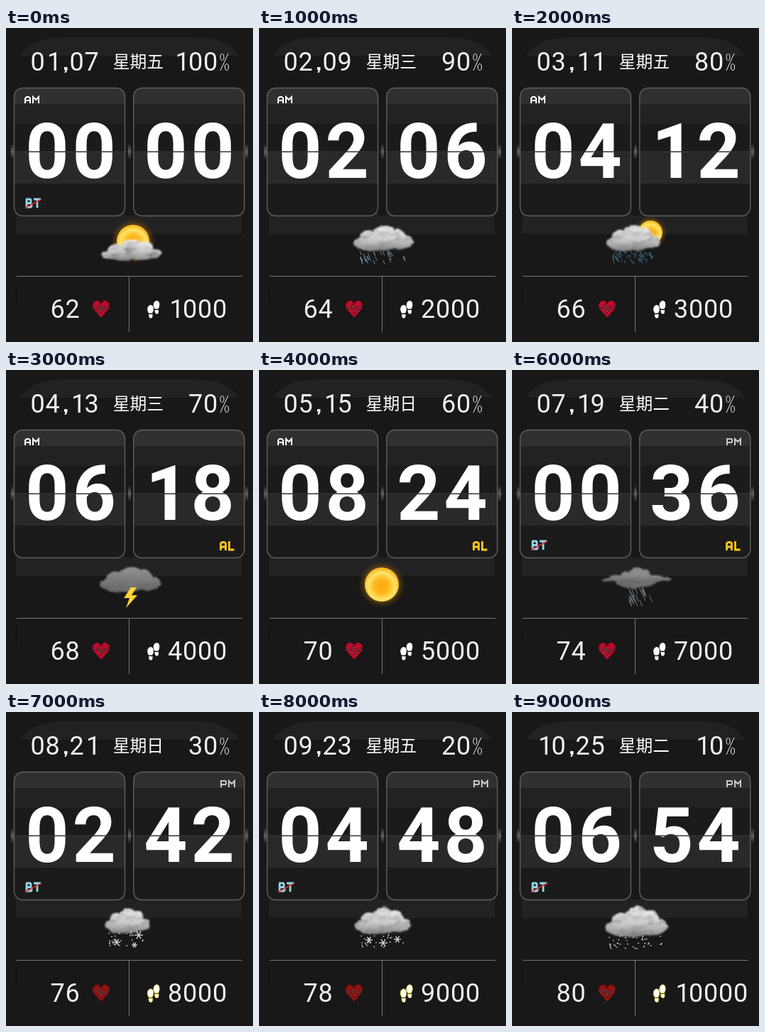
Animation, 348 px wide and 442 px high, one loop 10000 ms. Source, as an HTML page:

```html
<!DOCTYPE html>
<html lang="zh">
<head>
<meta charset="utf-8">
<title>Flip clock watch face</title>
<style>
  html, body { margin: 0; width: 100%; height: 100%; overflow: hidden; background: #181818; }
  svg { display: block; width: 100%; height: 100%; }
  .small { font: 400 36px Roboto, sans-serif; fill: #f0f0f0; }
  .big { font: 700 107px Roboto, sans-serif; text-anchor: middle; fill: #fff; }
  .day { font: 500 23.8px "Noto Sans CJK SC", "Noto Sans CJK", sans-serif; fill: #fff; }
  .tag { fill: none; stroke-width: 2; }
  .bold { stroke-width: 2.8; }
</style>
</head>
<body>
<svg viewBox="0 0 348 442" preserveAspectRatio="none">
  <defs>
    <radialGradient id="sunFill" cx=".5" cy=".55" r=".5">
      <stop offset="0" stop-color="#ffa30c"/><stop offset=".45" stop-color="#ffb91f"/>
      <stop offset=".8" stop-color="#ffe56a"/><stop offset="1" stop-color="#f6bd2c"/>
    </radialGradient>
    <radialGradient id="glow">
      <stop offset=".6" stop-color="#c98108" stop-opacity=".6"/>
      <stop offset="1" stop-color="#6b4200" stop-opacity="0"/>
    </radialGradient>
    <linearGradient id="light" x2="0" y2="1">
      <stop offset="0" stop-color="#f2f2f2"/><stop offset=".6" stop-color="#c8c8c8"/><stop offset="1" stop-color="#858585"/>
    </linearGradient>
    <linearGradient id="dark" x2="0" y2="1">
      <stop offset="0" stop-color="#999"/><stop offset="1" stop-color="#606060"/>
    </linearGradient>
    <linearGradient id="hinge" x2="0" y2="1">
      <stop offset="0" stop-color="#222"/><stop offset=".5" stop-color="#606060"/><stop offset="1" stop-color="#222"/>
    </linearGradient>
    <filter id="fluff" x="-10%" y="-15%" width="120%" height="130%">
      <feTurbulence type="fractalNoise" baseFrequency=".06 .12" numOctaves="3" seed="4" result="noise"/>
      <feColorMatrix in="noise" values="0 0 0 0 .2  0 0 0 0 .2  0 0 0 0 .2  2.2 0 0 0 -.95" result="shade"/>
      <feComposite in="shade" in2="SourceGraphic" operator="atop" result="mottled"/>
      <feDisplacementMap in="mottled" in2="noise" scale="6" xChannelSelector="R" yChannelSelector="G"/>
      <feGaussianBlur stdDeviation=".8"/>
    </filter>
    <clipPath id="cardClip"><rect width="156" height="180" rx="12"/></clipPath>
    <g id="card">
      <g clip-path="url(#cardClip)">
        <path fill="#1b1b1b" d="M0 0H156V180H0z"/>
        <path fill="#303030" d="M0 0H156V22.500H0z"/>
        <path fill="#222" d="M0 22.500H156V50.500H0z"/>
        <path fill="#292929" d="M0 89.500H156V134.500H0z"/>
      </g>
      <rect width="156" height="180" rx="12" fill="none" stroke="#606060" stroke-width="1.4"/>
    </g>
    <path id="pin" fill="url(#hinge)" d="M-2 -10H2V10H-2z"/>
  </defs>

  <path fill="#181818" d="M0 0H348V442H0z"/>
  <path fill="#222" d="M20 39Q36 13 82 13H266Q312 13 328 39z"/>
  <path fill="#222" d="M14 258H332V290H14z"/>
  <path fill="#181818" d="M168 84H180V264H168z"/>
  <path stroke="#0c0c0c" d="M14.500 360V388"/>
  <use href="#card" x="11.5" y="84.5"/>
  <use href="#card" x="179.8" y="84.5"/>
  <path stroke="#444" d="M5 174.5H343"/>
  <use href="#pin" x="9" y="174"/>
  <use href="#pin" x="174" y="174"/>
  <use href="#pin" x="339" y="174"/>
  <path stroke="#777" d="M15 349.5H333M173.5 350V428"/>

  <g id="face"></g>

  <g fill="none" stroke="#f0f0f0">
    <path d="M313 36L302 60"/>
    <ellipse cx="304.5" cy="41" rx="2.5" ry="4.5"/>
    <ellipse cx="311" cy="55" rx="2.5" ry="4.5"/>
  </g>
  <path fill="#f0f0f0" d="M82 55H86.500V59L84.500 63H82.500L83.500 59H82z"/>
  <path stroke="#343434" stroke-width="1.6" d="M12 174.300H167M181 174.300H335"/>
</svg>
<script>
const face = document.getElementById('face');
const STEP = 1000, COUNT = 10;
const weekdays = '五三五三五日五二日五二';
const weekday = i => '五三五三日五二日五二'[i];

const pad = n => String(n).padStart(2, '0');
const text = (x, y, value, cls) => `<text x="${x}" y="${y}" class="${cls}">${value}</text>`;

// Fixed pitch digits; the narrow 1 sits a little to the right in its cell.
const digits = (value, x, y, pitch, cls) => [...String(value)].map((c, i) =>
  text(x + i * pitch + (c === '1' ? 2.5 : 0), y, c, cls)).join('');
const small = (x, y, value) => digits(value, x, y, 21, 'small');
const pair = (value, x) => digits(pad(value), x, 211, 66.3, 'big');

const tag = (x, y, color, d, cls = '') =>
  `<path class="tag ${cls}" transform="translate(${x} ${y})" stroke="${color}" d="${d}"/>`;

function random(seed) {
  return () => (seed = seed * 16807 % 2147483647) / 2147483647;
}

function scatter(n, x, y, w, h, draw) {
  const rnd = random(77);
  return Array.from({ length: n }, () => draw(x + rnd() * w, y + rnd() * h)).join('');
}

const sun = (x, y, r) =>
  `<circle cx="${x}" cy="${y}" r="${r * 1.4}" fill="url(#glow)"/>` +
  `<circle cx="${x}" cy="${y}" r="${r}" fill="url(#sunFill)"/>`;

// Cloud outline lives in a 100 by 50 box.
const cloud = (x, y, w, h, fill = 'light') =>
  `<g filter="url(#fluff)"><path transform="translate(${x} ${y}) scale(${w / 100} ${h / 50})" fill="url(#${fill})"
    d="M12 45C-3 43-2 28 12 27C10 14 25 9 33 14C39-3 62-3 67 9C79 5 88 14 86 22C102 22 104 40 90 43C76 52 62 48 52 49C37 53 23 50 12 45z"/></g>`;

const rain = (n, x, y, w, h, color, length = 6) =>
  `<g stroke="${color}">${scatter(n, x, y, w, h, (a, b) =>
    `<path d="M${a} ${b}l${length / 2.5} ${length}"/>`)}</g>`;

const dots = (n, x, y, w, h) =>
  `<g fill="#ccc">${scatter(n, x, y, w, h, (a, b) => `<circle cx="${a}" cy="${b}" r=".9"/>`)}</g>`;

const flake = (x, y, r) => `<g transform="translate(${x} ${y})" stroke="#ddd" stroke-width="1.3">` +
  [0, 60, 120].map(a => `<path transform="rotate(${a})" d="M${-r} 0H${r}"/>`).join('') + '</g>';

const weather = [
  () => sun(179, 300, 23) + cloud(133, 297, 86, 30),
  () => cloud(132, 277, 86, 36) + rain(30, 142, 312, 62, 15, '#6d8799'),
  () => sun(195, 288, 17) + rain(90, 141, 306, 56, 22, '#3d647b', 4) + cloud(132, 276, 77, 37),
  () => cloud(131, 276, 88, 36, 'dark') + '<path fill="#ffd335" d="M176 306L166 321H174L169 335L185 317H177L184 306z"/>',
  () => sun(173, 302, 24),
  () => cloud(127, 284, 97, 44) + cloud(193, 275, 27, 11) + cloud(203, 287, 20, 10),
  () => rain(24, 164, 304, 30, 20, '#6f7d84', 9) + cloud(146, 277, 58, 30, 'dark') + cloud(126, 286, 100, 13, 'dark'),
  () => cloud(139, 275, 64, 36) + dots(26, 145, 309, 48, 20) +
    flake(187, 314, 6) + flake(156, 324, 5) + flake(181, 328, 4),
  () => cloud(134, 274, 80, 38) + dots(24, 144, 313, 60, 18) +
    flake(155, 321, 5) + flake(175, 325, 6) + flake(195, 320, 5),
  () => cloud(130, 273, 90, 43) + dots(42, 137, 315, 74, 18)
];

const letterM = 'M12 10V1L16 5L20 1V10';
const letterA = 'M1 10V3L3 1H6L8 3V10M1 6H8';
const letterP = 'M1 10V1H7L8 2V5L7 6H1';

function heart(color) {
  const pulse = 'M122 394H129L132 390L134 400L138 393L140 396L145 390';
  return `<path fill="${color}" stroke="#400b10" d="M134 408L123.500 396Q119 388 126 384Q131 382 134 388Q137 382 142 384Q149 388 144.500 396z"/>
    <path fill="none" stroke="#30060c" stroke-width="1.8" d="${pulse}"/>
    <path fill="none" stroke="#b98a92" stroke-width=".6" d="${pulse}"/>`;
}

function feet(edge) {
  const foot = (x, y) => `<g transform="translate(${x} ${y})" fill="#fff" stroke="${edge}" stroke-width=".8">
    <path d="M1 3Q4-2 8 2Q10 7 7 12H2Q-1 7 1 3z"/><path d="M2 13.500H7.500Q8 19 5 19Q2 19 2 13.500z"/></g>`;
  return foot(199, 389.5) + foot(207.5, 383.5);
}

function draw(i) {
  const late = i > 6, battery = 100 - i * 10;
  let out = small(34.5, 60, pad(i + 1)) + small(89.5, 60, pad(7 + 2 * i)) +
    text(150.7, 56, '星期' + weekday(i), 'day') +
    small(battery === 100 ? 236 : 257, 60, battery) +
    pair(i * 2 % 12, 58) + pair(i * 6, 225) +
    small(62.5, 407.5, 62 + 2 * i) + small(228, 407.5, (i + 1) * 1000) +
    weather[i]() + heart(late ? '#8d1510' : '#bd0c2b') + feet(late ? '#e8d72c' : 'none');

  out += i < 6
    ? tag(26, 96, '#fff', letterA + letterM)
    : tag(302, 96, '#c8c8c8', letterP + letterM);
  if (i === 0 || i > 4) {
    out += tag(27, 240, '#92d7e8', 'M2 1V12H8L9 11V8L7 6.500L8 5V2L7 1H1M2 6.500H7M12 1H22M17 1V13', 'bold') +
      '<path stroke="#e3262e" stroke-width="1.6" d="M27 253L50 241"/>';
  }
  if (i > 2 && i < 7) {
    out += tag(301, 241, '#ffc81e', 'M1.500 13V3L3.500 1.500H6.500L8.500 3V13M1 8H9M13.500 0V12H20.500', 'bold');
  }
  face.innerHTML = out;
}

let shown = -1;
function tick() {
  const i = Math.floor(performance.now() / STEP) % COUNT;
  if (i !== shown) draw(shown = i);
  requestAnimationFrame(tick);
}
tick();
</script>
</body>
</html>
```
